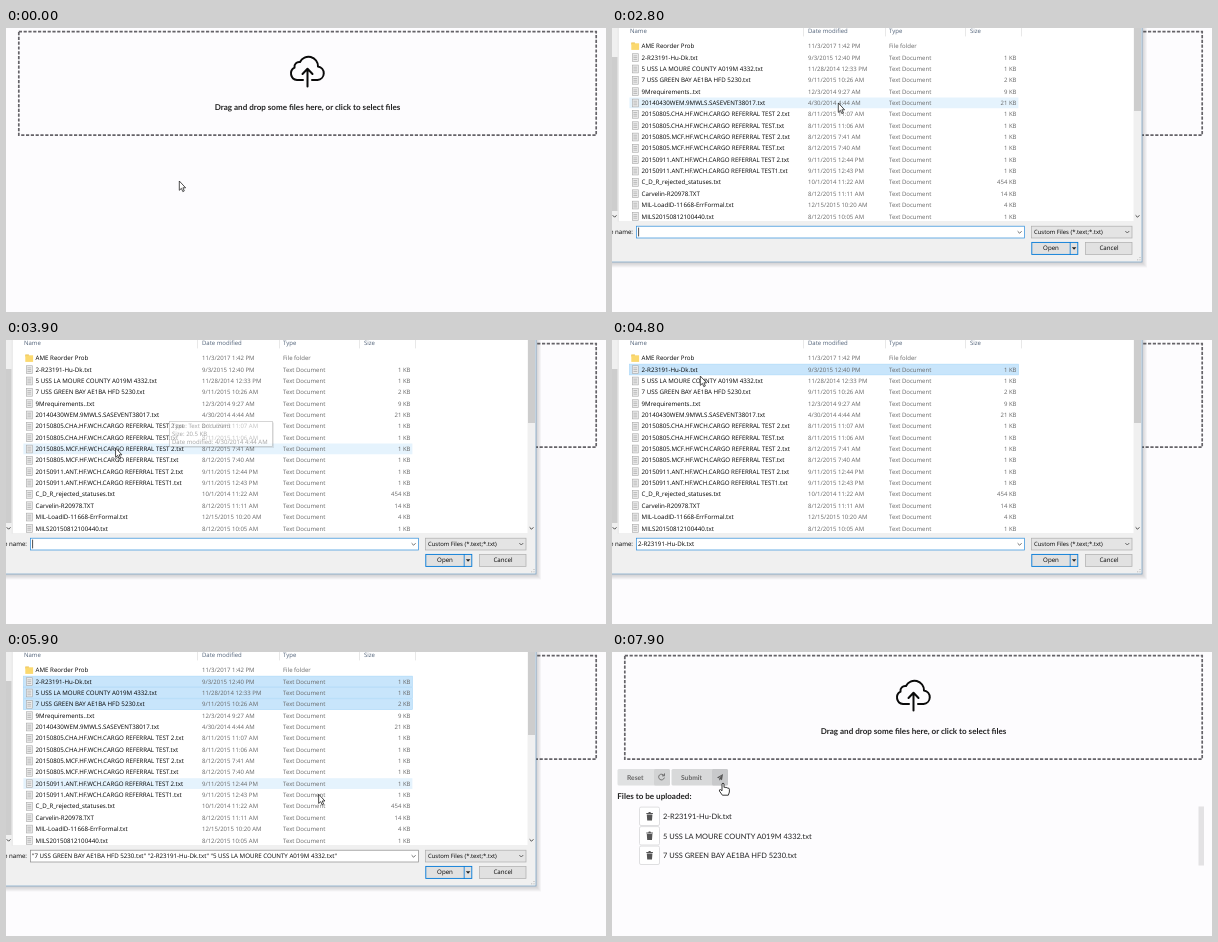
These frames come from a looping animation (600x284 px, 8 s). An HTML page:

```html
<!DOCTYPE html>
<html lang="en">
<head>
<meta charset="utf-8">
<title>File upload</title>
<style>
html, body { margin: 0; width: 100%; height: 100%; overflow: hidden; background: #fdfcfe; }
svg { display: block; width: 600px; height: 284px; }
text { text-rendering: geometricPrecision; white-space: pre; }
.page { font: 7.45px Lato, sans-serif; fill: #222; }
.bold { font: bold 8.07px Lato, sans-serif; fill: #222; }
.btn { font: bold 6.7px Lato, sans-serif; fill: #666; }
.name { font: 6.17px "Open Sans", "Noto Sans", sans-serif; fill: #000; }
.meta { font: 6px "Open Sans", "Noto Sans", sans-serif; fill: #666; }
.head { font: 6px "Open Sans", "Noto Sans", sans-serif; fill: #4f6077; }
.end { text-anchor: end; }
.mid { text-anchor: middle; }
.line { fill: none; stroke-linecap: round; stroke-linejoin: round; }
</style>
</head>
<body>
<svg viewBox="0 0 600 284">
  <rect x="12.8" y="3.6" width="577.4" height="103.6" fill="none" stroke="#656368" stroke-width="1.7" stroke-dasharray="3.2 1.6"/>
  <g class="line" stroke="#0a0a0a" stroke-width="2">
    <path d="M297 52H291A6.6 6.6 0 0 1 288.5 39.6A4.8 4.8 0 0 1 294 34A9.5 9.5 0 0 1 312 38.5A6.8 6.8 0 0 1 311.5 52H306"/>
    <path d="M301.5 58.5V41M296.5 46L301.5 40.8L306.5 46"/>
  </g>
  <text class="bold mid" x="301.5" y="82.3">Drag and drop some files here, or click to select files</text>
  <g id="uploads"></g>
  <g id="dialog"></g>
  <g id="tip">
    <rect x="164.5" y="82.5" width="103.5" height="25.5" fill="#000" opacity=".15"/>
    <rect x="163.5" y="81.5" width="103" height="25" fill="#fff" stroke="#aaa" stroke-width=".8"/>
    <text class="meta" x="166" y="88">Type: Text Document</text>
    <text class="meta" x="166" y="96">Size: 20.5 KB</text>
    <text class="meta" x="166" y="104">Date modified: 4/30/2014 4:44 AM</text>
  </g>
  <path id="arrow" d="M.3 0V9.3L2.4 7.4L3.8 10.6L5.3 9.9L3.9 6.8H6.6Z" fill="#fff" stroke="#222" stroke-width=".8"/>
  <path id="hand" d="M-1 .8Q0-.6 1 .8V4.4Q2 3.6 2.9 4.7Q4 4 4.8 5.2Q6.3 4.8 6.4 6.2V9L5.3 12.2H-.6L-3.6 8Q-3.9 6.3-2.4 6.6L-1 7.8Z" fill="#fff" stroke="#222" stroke-width=".9" stroke-linejoin="round"/>
</svg>
<script>
const $ = id => document.getElementById(id);
const text = (cls, x, y, s, more = '') => `<text class="${cls}" x="${x}" y="${y}" ${more}>${s}</text>`;
const box = (x, y, w, h, fill, more = '') => `<rect x="${x}" y="${y}" width="${w}" height="${h}" fill="${fill}" ${more}/>`;
const line = (d, color, w = 1) => `<path class="line" d="${d}" stroke="${color}" stroke-width="${w}"/>`;
const edge = (c, w = .7) => `stroke="${c}" stroke-width="${w}"`;
const show = (el, on) => el.setAttribute('opacity', +on);

// name | date | size in KB
const files = `AME Reorder Prob|11/3/2017 1:42 PM|
2-R23191-Hu-Dk.txt|9/3/2015 12:40 PM|1
5 USS LA MOURE COUNTY A019M 4332.txt|11/28/2014 12:33 PM|1
7 USS GREEN BAY AE1BA HFD 5230.txt|9/11/2015 10:26 AM|2
9Mrequirements..txt|12/3/2014 9:27 AM|9
20140430WEM.9MWLS.SASEVENT38017.txt|4/30/2014 4:44 AM|21
20150805.CHA.HF.WCH.CARGO REFERRAL TEST 2.txt|8/11/2015 11:07 AM|1
20150805.CHA.HF.WCH.CARGO REFERRAL TEST.txt|8/11/2015 11:06 AM|1
20150805.MCF.HF.WCH.CARGO REFERRAL TEST 2.txt|8/12/2015 7:41 AM|1
20150805.MCF.HF.WCH.CARGO REFERRAL TEST.txt|8/12/2015 7:40 AM|1
20150911.ANT.HF.WCH.CARGO REFERRAL TEST 2.txt|9/11/2015 12:44 PM|1
20150911.ANT.HF.WCH.CARGO REFERRAL TEST1.txt|9/11/2015 12:43 PM|1
C_D_R_rejected_statuses.txt|10/1/2014 11:22 AM|454
Carvelin-R20978.TXT|8/12/2015 11:11 AM|14
MIL-LoadID-11668-ErrFormal.txt|12/15/2015 10:20 AM|4
MILS20150812100440.txt|8/12/2015 10:05 AM|1`.split('\n').map(r => r.split('|'));
const top0 = 12.5, pitch = 11.34;
const chosen = [1, 2, 3];

function uploads() {
  const button = (x, w, label, tx, fill, dark) =>
    box(x, 117, w, 16.5, fill, 'rx="1.5"') + box(x + w - 16, 117, 16, 16.5, dark, 'rx="1.5"') + text('btn', tx, 127.7, label);
  const trash = y => box(27.5, y + .5, 20, 18.4, '#fff', 'rx="1.5" ' + edge('#dcdcde', .9)) +
    `<path d="M34.3 ${y + 6.4}h2l.5-1h1.6l.5 1h2v1h-6.6zM34.8 ${y + 8}h5.6l-.4 5.8h-4.8z" fill="#555"/>`;
  return button(5.5, 52.5, 'Reset', 15, '#e0e1e2', '#d2d3d4') +
    line('M51.9 123.3A2.9 2.9 0 1 0 52.3 126M52.5 121.8V123.8H50.4', '#666', .9) +
    button(59.5, 56.5, 'Submit', 69, '#d8d9da', '#c8c9cb') +
    '<path d="M105 125.6L111 122L110 128.2L108.2 127.2L107.2 128.8V126.6L109.8 123.6L106.4 126.2Z" fill="#555"/>' +
    text('bold', 5.3, 147.2, 'Files to be uploaded:') +
    chosen.map((n, i) => trash(154.6 + i * 19.5) + text('page', 51, 167.2 + i * 19.5, files[n][0])).join('') +
    box(586.5, 154.5, 5.5, 59, '#e3e2e4');
}

function row([name, date, size], i) {
  const y = top0 + i * pitch, base = y + 7.9;
  const icon = i
    ? box(20.3, y + 1.9, 6, 7.8, '#ececec', edge('#a8a8a8', .6)) +
      line(`M21.8 ${y + 4}h3M21.8 ${y + 5.8}h3M21.8 ${y + 7.6}h3`, '#999', .6)
    : box(19.3, y + 2, 3.6, 2, '#e8bd4c') + box(19.3, y + 2.8, 7.8, 6.6, '#fbd96f');
  return box(17.4, y + .3, 389, pitch - .6, 'none', 'class="row"') + icon +
    text('name', 29.6, base, name) + text('meta', 196, base, date) +
    text('meta', 277, base, i ? 'Text Document' : 'File folder') +
    (size && text('meta end', 404.5, base, size + ' KB'));
}

function dialog() {
  const shadow = [5, 4, 3, 2, 1].map(d => box(-10, -10, 540 + d, 244.5 + d, '#000', 'opacity=".035"')).join('');
  return shadow + box(-5, -5, 535, 239, '#f0f0f0', edge('#6f9dc2')) +
    box(6, 0, 515.5, 193, '#fff') + box(0, 29, 5.5, 154, '#cdcdcd') + line('M6.3 0V193', '#dcdcdc', .7) +
    box(522, 0, 7, 83, '#cdcdcd') +
    line('M1 187.6L2.6 189.2L4.2 187.6M523.9 187.6L525.5 189.2L527.1 187.6', '#444', 1) +
    line('M191.5 0V8M273.5 0V8M353.5 0V8M409.5 0V8', '#e3e3e3', .8) +
    [[18, 'Name'], [196, 'Date modified'], [277, 'Type'], [358, 'Size']].map(([x, s]) => text('head', x, 4.6, s)).join('') +
    files.map(row).join('') +
    text('name end', 21, 206.3, 'File name:') +
    box(24.4, 198.2, 388, 11.8, '#fff', 'id="input" ' + edge('#0078d7')) + box(25.3, 199.2, 306, 9.6, '#0078d7', 'id="mark"') +
    text('name', 26, 206.3, '', 'id="field"') + line('M26.6 200V208', '#000', .7).replace('<path', '<path id="caret"') +
    line('M405.9 203.5L407.6 205.2L409.3 203.5', '#444', .8) +
    box(419.5, 198.2, 100.5, 11.8, '#e4e4e4', edge('#adadad')) +
    text('name', 422, 206.3, 'Custom Files (*.text;*.txt)', 'style="font-size:5.9px"') +
    line('M513.6 203.3L515.3 205L517 203.3', '#444', .8) +
    box(419.8, 214.4, 46, 12, '#e1e1e1', 'id="open" ' + edge('#0078d7', .9)) + line('M458.2 214.5V226.5', '#0078d7', .8) +
    text('name mid', 439, 222.3, 'Open') + '<path d="M459.8 219.2h4.6l-2.3 2.6z" fill="#222"/>' +
    box(473.5, 214.4, 46.5, 12, '#e1e1e1', edge('#adadad')) + text('name mid', 497, 222.3, 'Cancel') +
    line('M528 229.5V229.6M528 231.8V231.9M525.7 231.8V231.9', '#aaa', 1);
}

$('uploads').innerHTML = uploads();
$('dialog').innerHTML = dialog();
const rows = document.querySelectorAll('.row');

// pointer path: time, x, y
const path = [
  [50, 173, 153], [250, 205, 132], [500, 310, 86], [700, 384, 60], [900, 359, 57],
  [1300, 270, 65], [1800, 219, 70], [2500, 222, 72], [2750, 226, 75], [2850, 226, 75],
  [3150, 160, 74], [3600, 160, 74], [3850, 110, 108], [3920, 109, 108], [4350, 86, 31],
  [4700, 87, 32], [4800, 88, 36], [4950, 90, 41], [5100, 90, 42], [5250, 92, 52],
  [5500, 92, 52], [5900, 312, 142], [6280, 441, 217], [6900, 441, 217], [7200, 424, 205],
  [7400, 230, 105], [7550, 70, 81], [7650, 38, 96], [7850, 111, 131]
];
function pointer(t) {
  const i = path.findIndex(p => p[0] > t);
  if (i < 1) return (i ? path[path.length - 1] : path[0]).slice(1);
  const [a, b] = [path[i - 1], path[i]], k = (t - a[0]) / (b[0] - a[0]);
  return [a[1] + (b[1] - a[1]) * k, a[2] + (b[2] - a[2]) * k];
}
const ramp = (t, from, to) => Math.min(1, Math.max(0, (t - from) / (to - from)));

const clicks = [4450, 5050, 5350];
const listed = [[], [1], [2, 1], [3, 1, 2]];

function draw(t) {
  const [x, y] = pointer(t);
  const picked = clicks.filter(c => t >= c).length;
  const confirmed = t >= 6600;
  const dialogOn = t > 2500 && t < 7000;

  show($('dialog'), ramp(t, 2500, 2720) * (1 - ramp(t, 6900, 7000)));
  show($('uploads'), t >= 7050);
  show($('tip'), ramp(t, 3520, 3620) * (1 - ramp(t, 3800, 4050)));

  // the row highlight trails the pointer slightly
  const [hx, hy] = pointer(t - 60);
  const hover = hx > 17 && hx < 407 ? Math.floor((hy - top0) / pitch) : -1;
  rows.forEach((r, i) => {
    const on = i > 0 && i <= picked;
    r.setAttribute('fill', on ? (confirmed ? '#d9d9d9' : '#c8e5fb') : i === hover ? '#e5f3fd' : 'none');
    r.setAttribute('stroke', on ? (confirmed ? '#c8c8c8' : '#a9d6f7') : 'none');
    r.setAttribute('stroke-width', .6);
  });

  const names = listed[picked].map(n => files[n][0]);
  $('field').textContent = picked > 1 ? names.map(n => `"${n}"`).join(' ') : names.join('');
  $('field').style.fill = confirmed ? '#fff' : '#000';
  $('input').setAttribute('stroke', picked > 1 && !confirmed ? '#8a8a8a' : '#2b8cdb');
  show($('mark'), confirmed);
  show($('caret'), !picked && (t + 380) % 1060 < 530);
  $('open').setAttribute('fill', t >= 6250 ? '#d5e9f9' : '#e1e1e1');

  const overZone = x > 12 && x < 591 && y > 3 && y < 108;
  const overButton = t > 7100 && x > 5 && x < 116 && y > 117 && y < 134;
  const link = !dialogOn && (overZone || overButton);
  show($('hand'), link);
  show($('arrow'), !link);
  for (const id of ['hand', 'arrow']) $(id).setAttribute('transform', `translate(${x} ${y})`);
}

const start = performance.now();
function tick() {
  draw((performance.now() - start) % 8000);
  requestAnimationFrame(tick);
}
tick();
</script>
</body>
</html>
```
